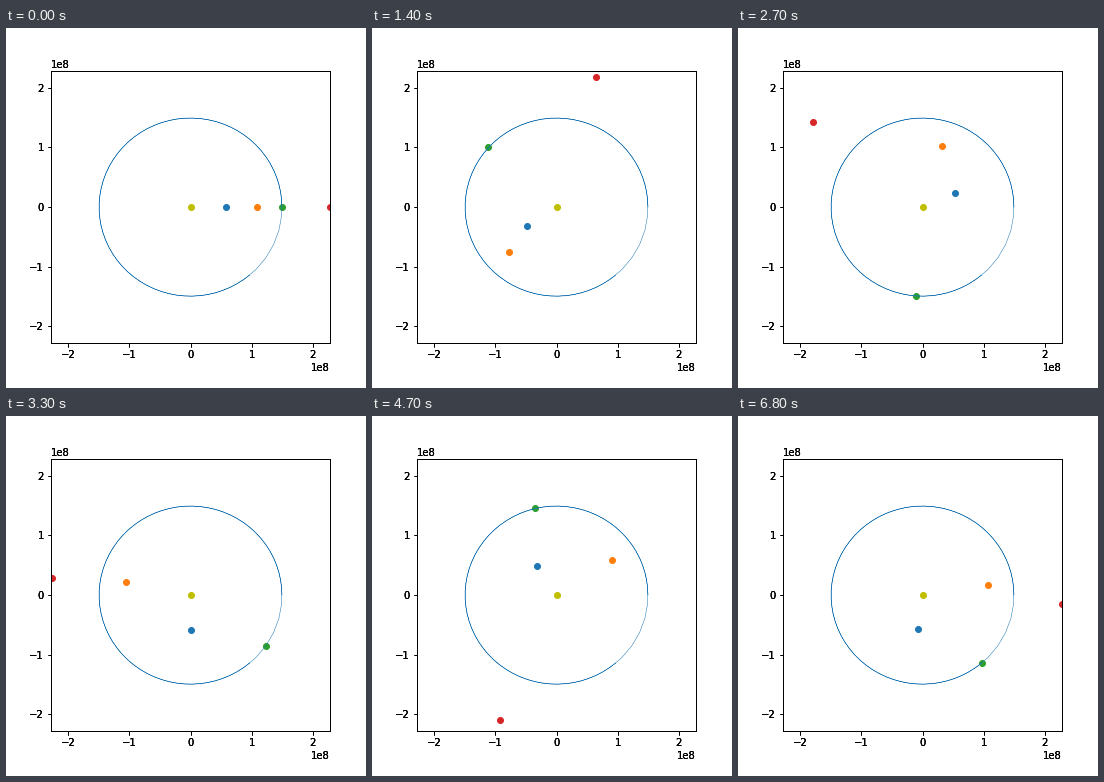
A matplotlib script that plays this animation: 360x360 px, repeating every 6900 ms.

```python
import numpy as np
import matplotlib.pyplot as plt
from matplotlib.animation import FuncAnimation

FRAMES = 69
DAYS_PER_FRAME = 10
LIMIT = 2.279e8  # km

# orbit radius (km), period (days), colour
PLANETS = [
    (0.579e8, 87.97, "C0"),
    (1.082e8, 224.7, "C1"),
    (1.496e8, 365.2, "C2"),
    (2.279e8, 687.0, "C3"),
]

fig = plt.figure(figsize=(5, 5), dpi=72, facecolor="white")


def add_layer(name):
    ax = fig.add_axes([0.125, 0.125, 0.775, 0.755], label=name)
    ax.set(xlim=(-LIMIT, LIMIT), ylim=(-LIMIT, LIMIT))
    ticks = np.arange(-2, 3) * 1e8
    ax.set_xticks(ticks)
    ax.set_yticks(ticks)
    return ax


def position(radius, period, step):
    angle = 2 * np.pi * step * DAYS_PER_FRAME / period
    return radius * np.cos(angle), radius * np.sin(angle)


ax = add_layer("main")
# Overlaid axes give the labels their heavy, saturated edges
for i in range(2):
    add_layer(f"overlay{i}").patch.set_visible(False)

dots = [ax.scatter([r], [0], color=color) for r, _, color in PLANETS]
ax.scatter([0], [0], color="y")

# The orbit laps itself, so the part covered once looks fainter
radius, period, _ = PLANETS[2]
ax.plot(*position(radius, period, np.arange(FRAMES)), color="C0", lw=0.5)


def update(step):
    for dot, (r, p, _) in zip(dots, PLANETS):
        dot.set_offsets([position(r, p, step)])
    return dots


anim = FuncAnimation(fig, update, frames=FRAMES, interval=100, repeat=True)
plt.show()
```
